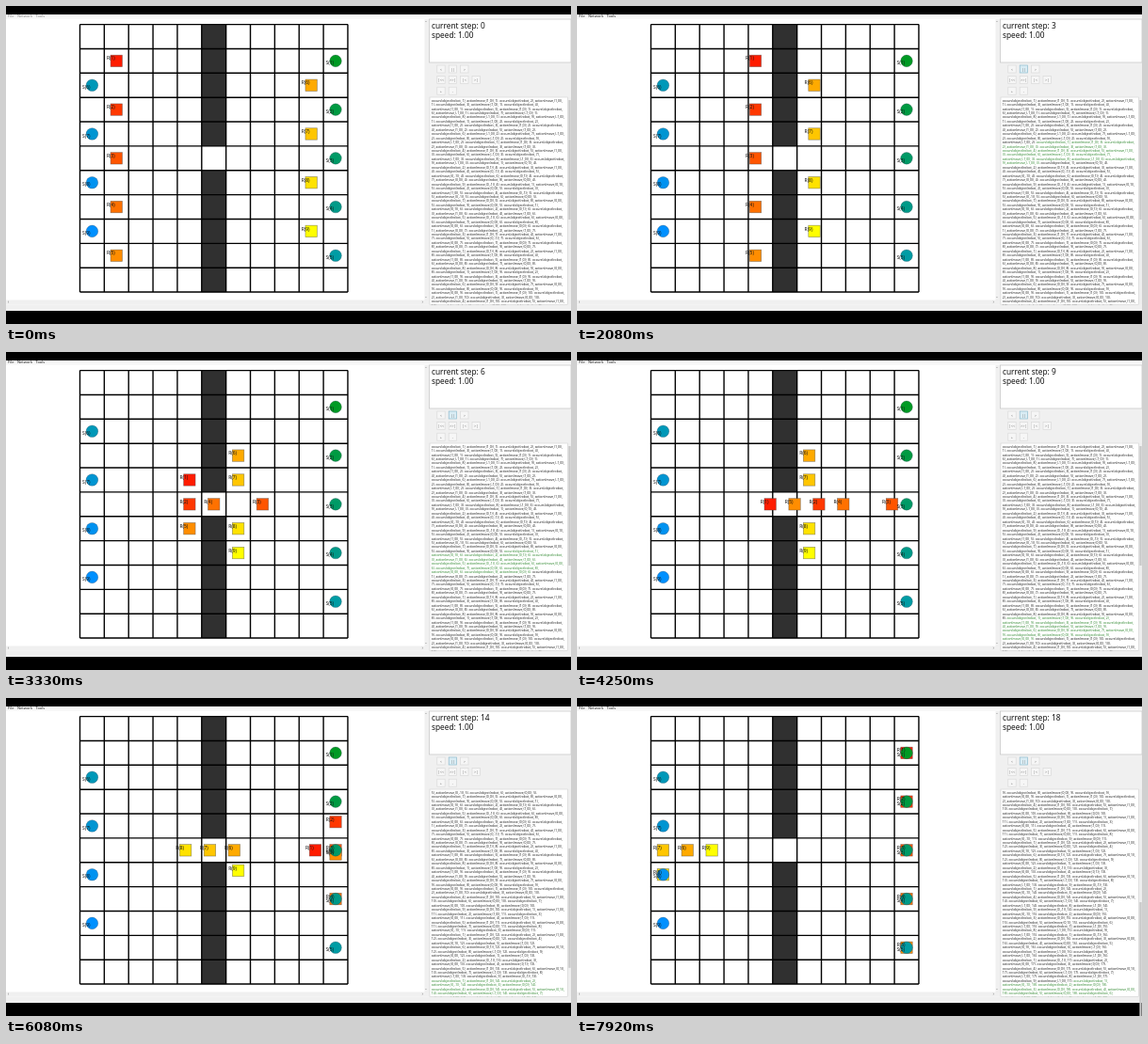
Recreate the animation shown at these times as an HTML page with a canvas. Size 600 by 338 pixels, loop 8 s.

```html
<!DOCTYPE html>
<html lang="en">
<head>
<meta charset="utf-8">
<title>Robot plan viewer</title>
<style>
  html, body { margin: 0; width: 100%; height: 100%; overflow: hidden; background: #000; }
  canvas { display: block; width: 600px; height: 338px; }
</style>
</head>
<body>
<canvas></canvas>
<script>
const canvas = document.querySelector('canvas');
const ctx = canvas.getContext('2d');
const scale = Math.max(1, window.devicePixelRatio || 1);
canvas.width = 600 * scale;
canvas.height = 338 * scale;

const LOOP = 8000, FPS = 12;
const START = 1080, STEP = 381, MOVE = 305, PLAY = 500, LAST_STEP = 18;
const SANS = '"Noto Sans", "Open Sans", sans-serif';
const CELL = 25.86, LEFT = 78.5, TOP = 19.6, SIZE = 11;
const WINDOW_BOTTOM = 324, PANEL_BOTTOM = 317.5;
const DIRECTIONS = { R: [1, 0], L: [-1, 0], U: [0, -1], D: [0, 1], '.': [0, 0] };

// Start cell and one move letter per step.
const robots = [
  [1, 1, 'RRRDDD.DRRRRRRUUUU', '#ff1c00'],
  [1, 3, 'RRRD.DRRRRRRUU', '#ff3800'],
  [1, 5, 'RRRRRRRRR', '#ff5500'],
  [1, 7, 'RRRUURRRRRRDD', '#ff7100'],
  [1, 9, 'RRRUUUURRRRRRDDDD', '#ff8d00'],
  [9, 2, 'LLLD.......DDLLLLL', '#ffaa00'],
  [9, 4, 'LLL........DLLLLLL', '#ffc600'],
  [9, 6, 'LLL.......ULLLLLLD', '#ffe200'],
  [9, 8, 'LLLU........UULLLL', '#ffff00'],
].map(([col, row, moves, color]) => ({ col, row, moves: moves.padEnd(20, '.'), color }));

const shelves = [
  [10, 1, '#009a24'], [10, 3, '#009a42'], [10, 5, '#009a66'],
  [10, 7, '#009a88'], [10, 9, '#009ca4'],
  [0, 2, '#0098b8'], [0, 4, '#0095d2'], [0, 6, '#0092f0'], [0, 8, '#0090ff'],
];

const centre = (col, row) => [LEFT + (col + 0.5) * CELL, TOP + (row + 0.5) * CELL];

function rect(x, y, w, h, fill, stroke, width = 1) {
  ctx.fillStyle = fill;
  ctx.fillRect(x, y, w, h);
  if (stroke) {
    ctx.strokeStyle = stroke;
    ctx.lineWidth = width;
    ctx.strokeRect(x, y, w, h);
  }
}

function label(text, x, y, size, color = '#111') {
  ctx.font = `${size}px ${SANS}`;
  ctx.fillStyle = color;
  ctx.fillText(text, x, y);
}

// Plan text, wrapped into lines of words that remember their step.
const PLAN_FONT = 3.4, LINE = 4.45, PLAN_WIDTH = 142;
const planLines = [[]], firstLine = [];

function layoutPlan() {
  ctx.font = `${PLAN_FONT}px ${SANS}`;
  const space = ctx.measureText(' ').width;
  let x = 0;
  for (let step = 1; step <= 20; step++) {
    robots.forEach((robot, i) => {
      const move = DIRECTIONS[robot.moves[step - 1]].join(',');
      const fact = `occurs(object(robot, ${i + 1}), action(move,(${move})), ${step}).`;
      for (const word of fact.split(' ')) {
        const width = ctx.measureText(word).width;
        if (x + width > PLAN_WIDTH) {
          planLines.push([]);
          x = 0;
        }
        firstLine[step] ??= planLines.length - 1;
        planLines.at(-1).push({ word, x, step });
        x += width + space;
      }
    });
  }
}

function drawPlan(step) {
  const height = PANEL_BOTTOM - 97;
  const scroll = step > 11 ? firstLine[step] - 45 : 0;
  rect(450, 97, 146.5, height, '#fff', '#d0d0d0', 0.6);
  ctx.save();
  ctx.beginPath();
  ctx.rect(450, 97, 146, height);
  ctx.clip();
  ctx.font = `${PLAN_FONT}px ${SANS}`;
  planLines.slice(scroll, scroll + 50).forEach((line, i) => {
    for (const part of line) {
      ctx.fillStyle = part.step === step ? '#2c862c' : '#222';
      ctx.fillText(part.word, 451.8 + part.x, 101.6 + i * LINE);
    }
  });
  ctx.restore();
  rect(597, 97, 3, height, '#eee');
  rect(597.4, 100 + scroll * 2.6, 2.2, 127, '#c8c8c8');
}

function drawButtons(playing) {
  const rows = [['<', '||', '>'], ['|<<', '>>|', '|<', '>|'], ['+', '-']];
  ctx.textAlign = 'center';
  rows.forEach((names, r) => names.forEach((name, c) => {
    const x = 462 + c * 12.4, y = 67 + r * 11.6;
    const active = playing && name === '||';
    rect(x - 4.2, y - 4, 8.4, 8, active ? '#d9ecf4' : '#f6f6f6', active ? '#8fbccf' : '#dadada', 0.7);
    label(name, x, y + 1.5, 4, '#777');
  }));
  ctx.textAlign = 'left';
}

function drawGrid() {
  const edge = SIZE * CELL;
  ctx.fillStyle = '#303030';
  ctx.fillRect(LEFT + 5 * CELL, TOP, CELL, 5 * CELL);
  ctx.fillRect(LEFT + 5 * CELL, TOP + 6 * CELL, CELL, 5 * CELL);
  ctx.strokeStyle = '#000';
  ctx.lineWidth = 1.4;
  ctx.beginPath();
  for (let i = 0; i <= SIZE; i++) {
    const d = i * CELL;
    ctx.moveTo(LEFT + d, TOP);
    ctx.lineTo(LEFT + d, TOP + edge);
    ctx.moveTo(LEFT, TOP + d);
    ctx.lineTo(LEFT + edge, TOP + d);
  }
  ctx.stroke();
}

function robotCentre({ col, row, moves }, progress) {
  for (let i = 0; i < progress; i++) {
    const [dx, dy] = DIRECTIONS[moves[i]];
    const part = Math.min(1, progress - i);
    col += dx * part;
    row += dy * part;
  }
  return centre(col, row);
}

function drawScene(progress) {
  drawGrid();
  const places = robots.map(robot => robotCentre(robot, progress));
  places.forEach(([x, y], i) => rect(x - 6.2, y - 6.2, 12.4, 12.4, robots[i].color, '#4448', 0.7));
  shelves.forEach(([col, row, color], i) => {
    const [x, y] = centre(col, row);
    ctx.beginPath();
    ctx.arc(x, y, 6.3, 0, 2 * Math.PI);
    ctx.fillStyle = color;
    ctx.fill();
    ctx.strokeStyle = '#2348';
    ctx.lineWidth = 0.5;
    ctx.stroke();
    label(`S(${i + 1})`, x - 10.4, y + 3.8, 4.9);
  });
  places.forEach(([x, y], i) => label(`R(${i + 1})`, x - 10.4, y - 0.9, 4.9));
}

function drawWindow(time) {
  rect(0, 0, 600, 338, '#000');
  rect(0, 9, 600, WINDOW_BOTTOM - 9, '#fff');
  rect(0, 9, 600, 5, '#f8f8f8');
  const ink = time < 160 ? '#888' : '#222';
  [['File', 2], ['Network', 12], ['Tools', 31.5]].forEach(([name, x]) => label(name, x, 12.2, 4, ink));

  // Scroll bars of the grid view and the status strip.
  rect(444.5, 14, 3.5, 299, '#f0f0f0');
  rect(0, 312.5, 448, 5, '#f0f0f0');
  rect(0, PANEL_BOTTOM, 600, WINDOW_BOTTOM - PANEL_BOTTOM, '#f0f0f0');
  label('‹', 1.8, 316.4, 5, '#777');
  label('›', 441.5, 316.4, 5, '#777');
  label('ˆ', 445, 19.5, 4.5, '#777');
  label('ˇ', 445, 313, 4.5, '#777');

  rect(448, 14, 152, PANEL_BOTTOM - 14, '#f0f0f0');
  rect(449.5, 14, 150.5, 46, '#fff', '#c4c4c4', 0.7);
}

function draw(time) {
  const elapsed = time - START;
  const done = Math.floor(elapsed / STEP);
  const step = elapsed < 0 ? 0 : Math.min(LAST_STEP, done + 1);
  const progress = elapsed < 0 ? 0
    : Math.min(LAST_STEP, done + Math.min(1, (elapsed - done * STEP) / MOVE));

  ctx.setTransform(scale, 0, 0, scale, 0, 0);
  drawWindow(time);
  drawScene(progress);
  label(`current step: ${step}`, 452, 23.6, 8.3);
  label('speed: 1.00', 452, 34.1, 8.3);
  drawButtons(time >= PLAY - 5);
  drawPlan(step);
}

layoutPlan();
const begin = performance.now();
function tick() {
  const time = (performance.now() - begin) % LOOP;
  draw(Math.floor((time + 4) * FPS / 1000) * 1000 / FPS);
  requestAnimationFrame(tick);
}
tick();
</script>
</body>
</html>
```
